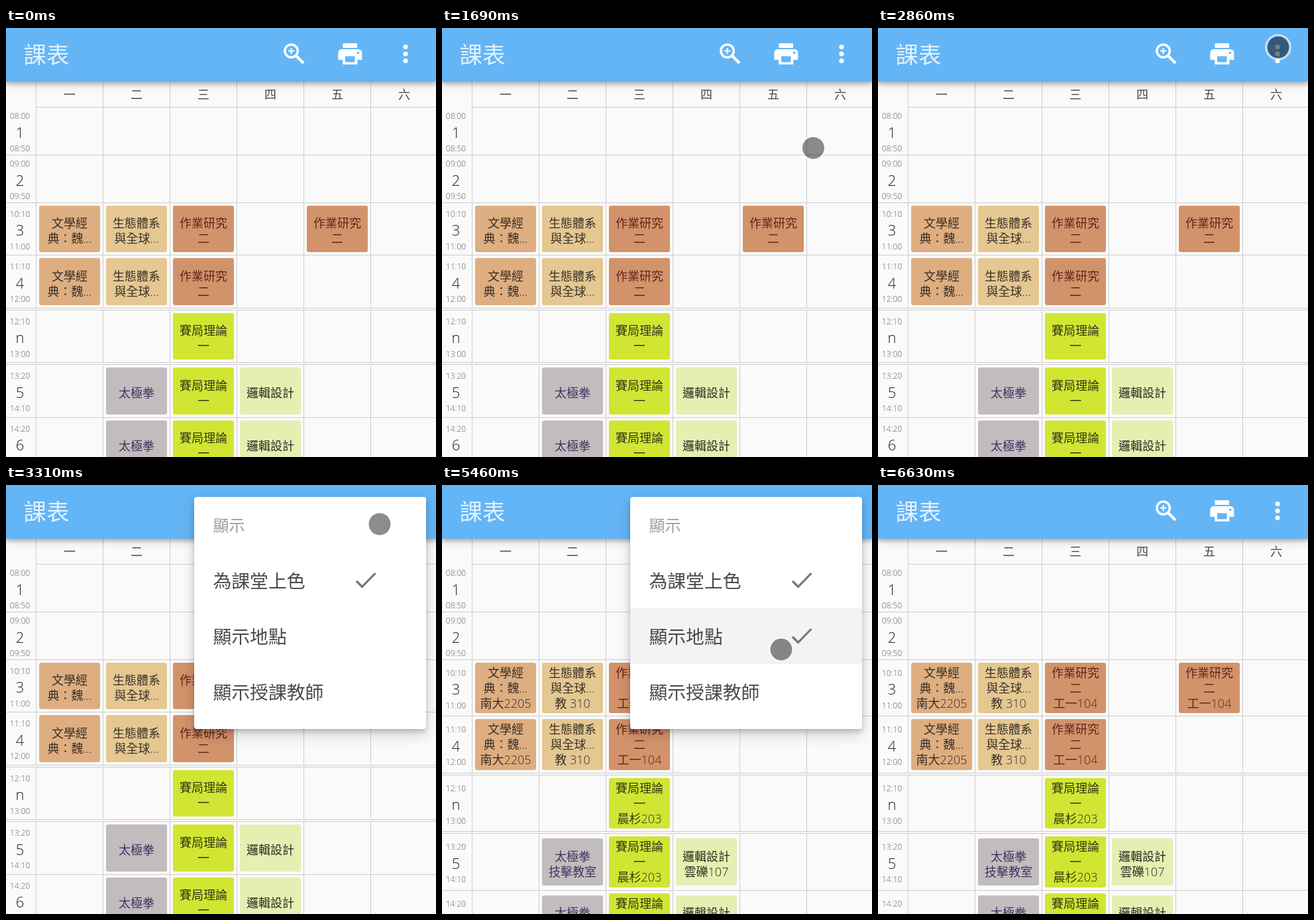
These frames come from a looping animation (649x647 px, 7380 ms). An HTML page:

```html
<!DOCTYPE html>
<html lang="zh-Hant-TW">
<head>
<meta charset="utf-8">
<title>課表</title>
<style>
html, body { margin: 0; width: 100%; height: 100%; overflow: hidden; background: #fafafa; }
svg { display: block; width: 649px; height: 647px; font-weight: 350;
  font-family: "Open Sans", "Noto Sans CJK TC", "Noto Sans CJK HK", "Noto Sans CJK JP", "Noto Sans CJK", sans-serif; }
#bar { filter: drop-shadow(0 3px 3px rgba(0,0,0,.24)) drop-shadow(0 4px 6px rgba(0,0,0,.14)); }
#panel { filter: drop-shadow(0 4px 3px rgba(0,0,0,.16)) drop-shadow(0 7px 10px rgba(0,0,0,.18)); }
#menu { transform-origin: 634px 18px; }
</style>
</head>
<body>
<svg viewBox="0 0 649 647">
  <g id="plain"></g>
  <g id="rooms"></g>
  <rect id="scroll" x="642" y="81" width="3" height="566"/>
  <g id="bar"><rect y="-20" width="649" height="101" fill="#64b5f6"/></g>
  <g id="title"></g>
  <g fill="none" stroke="#fff" stroke-width="3.5">
    <circle cx="430.6" cy="34.6" r="9.7"/>
    <path d="M437.5 41.5L449 53" stroke-width="4.4"/>
    <path d="M426 34.6h9.2M430.6 30v9.2" stroke-width="2"/>
  </g>
  <g fill="#fff">
    <path d="M508.5 23H530v7h-21.500z"/>
    <path d="M507 32h25a5.300 5.300 0 0 1 5.300 5.300V48h-7v7h-22v-7h-7V37.300A5.300 5.300 0 0 1 507 32z"/>
    <g id="dots"></g>
  </g>
  <g fill="#64b5f6"><rect x="512" y="42.500" width="14.500" height="9"/><circle cx="531.500" cy="37.500" r="1.800"/></g>
  <g id="menu">
    <rect id="panel" x="284" y="18" width="350" height="350" rx="4" fill="#fff"/>
    <rect id="press" x="284" y="186" width="350" height="84" fill="#f3f3f3"/>
    <path id="check" d="M529 145l8.500 8.500L557.500 133" fill="none" stroke="#757575" stroke-width="3.200"/>
    <use id="check2" href="#check" y="84"/>
  </g>
  <g id="touch"><circle id="halo" fill="none" stroke="#fff" stroke-opacity=".6"/><circle id="dot" r="16.500"/></g>
</svg>
<script>
const LOOP = 7380;
const $ = id => document.getElementById(id);

function add(parent, tag, attrs, text = '') {
  const el = document.createElementNS('http://www.w3.org/2000/svg', tag);
  for (const k in attrs) el.setAttribute(k, attrs[k]);
  el.textContent = text;
  parent.append(el);
}

// y is the optical centre; dense glyphs are softened to look light
function label(parent, text, x, y, size, fill, anchor = 'middle') {
  const han = /[^\x00-\x7f]/.test(text);
  add(parent, 'text', {
    x, y: y + size * (han ? .38 : .357), fill, 'font-size': size,
    'fill-opacity': han ? .82 : 1, 'text-anchor': anchor
  }, text);
}

const box = (g, x, y, width, height, fill, rx = 0) => add(g, 'rect', { x, y, width, height, fill, rx });
const colX = i => 45 + 101 * i;
const clock = m => [m / 60 | 0, m % 60].map(n => String(n).padStart(2, '0')).join(':');

const courses = [
  { lines: ['文學經', '典：魏…'], room: '南大2205', bg: '#deae80', ink: '#111' },
  { lines: ['生態體系', '與全球…'], room: '教 310', bg: '#e5c792', ink: '#111' },
  { lines: ['作業研究', '二'], room: '工一104', bg: '#d2936a', ink: '#460c0c' },
  { lines: ['賽局理論', '一'], room: '晨杉203', bg: '#d1e533', ink: '#111' },
  { lines: ['太極拳'], room: '技擊教室', bg: '#c3bcbe', ink: '#1d164a' },
  { lines: ['邏輯設計'], room: '雲礫107', bg: '#e5efb2', ink: '#000' }
];
// one string per period, one course index per weekday
const week = ['', '', '012 2', '012', '  3', ' 435', ' 435'];

function drawCard(g, course, x, mid, withRoom) {
  const lines = withRoom ? [...course.lines, course.room] : course.lines;
  const tall = lines.length > 2;
  const half = tall ? 38.25 : 35.25;
  const top = Math.round(mid - half);
  box(g, x + 5, top, 92, Math.round(mid + half) - top, course.bg, 3);
  lines.forEach((s, i) => label(g, s, x + 51,
    mid + (tall ? 0 : 3) + (i - (lines.length - 1) / 2) * 23, 18, course.ink));
}

function drawTable(g, rowHeight, withRoom) {
  for (let i = 0; i < 6; i++) {
    box(g, colX(i), 81, 1, 566, '#ccc');
    label(g, '一二三四五六'[i], colX(i) + 51, 100.5, 18, '#222');
  }
  let y = 119;
  week.forEach((days, i) => {
    if (i === 4 || i === 5) {
      const edge = Math.floor(y);
      box(g, 0, edge, 649, 3, '#fafafa');
      box(g, 0, edge, 649, 1, '#ccc');
      y += 3;
    }
    const height = i < 2 ? 72 : rowHeight;
    const mid = y + height / 2 + .25;
    const start = 480 + 60 * i + (i > 1) * 10 + (i > 4) * 10;
    box(g, i ? 0 : 45, Math.floor(y), 649, 1, '#ccc');
    label(g, clock(start), 21, mid - 22.5, 12, '#666');
    label(g, '1234n56'[i], 21, mid + 2.5, 22, '#222');
    label(g, clock(start + 50), 21, mid + 26.5, 12, '#666');
    [...days].forEach((d, col) => {
      if (d !== ' ') drawCard(g, courses[d], colX(col), mid, withRoom);
    });
    y += height;
  });
}

drawTable($('plain'), 79.5, false);
drawTable($('rooms'), 85.5, true);
label($('title'), '課表', 26.5, 40, 34.5, '#fff', 'start');
for (let i = 0; i < 3; i++) add($('dots'), 'circle', { cx: 603, cy: 28.5 + 10.5 * i, r: 3.6 });
label($('menu'), '顯示', 312.5, 60.5, 24, '#888', 'start');
['為課堂上色', '顯示地點', '顯示授課教師'].forEach((s, i) =>
  label($('menu'), s, 312.5, 144 + 84 * i, 27.8, '#222', 'start'));

// pointer stops: time, x, y
const stops = [
  [840, 494, 506], [1510, 598, 40], [2024, 466, 535], [2720, 604, 29], [3200, 604, 29],
  [3310, 564, 59], [3950, 512, 214], [5440, 512, 214], [5458, 512, 248],
  [5850, 499, 560], [6200, 499, 560], [6630, 581, 354]
];
const ramp = (t, a, b) => Math.max(0, Math.min(1, (t - a) / (b - a)));
const ease = k => k * k * (3 - 2 * k);
const during = (t, a, b) => t >= a && t < b;
const show = (id, on) => $(id).style.display = on ? '' : 'none';

function pointer(t) {
  const i = stops.findIndex(s => s[0] > t);
  const [a, b] = [stops[i - 1], stops[i]];
  const k = ease(ramp(t, a[0], b[0]));
  return [1, 2].map(n => a[n] + (b[n] - a[n]) * k);
}

function draw(t) {
  const rooms = t >= 4330;
  show('plain', !rooms);
  show('rooms', rooms);
  show('check2', rooms);
  $('scroll').style.opacity = .22 * ramp(t, 4260, 4400) * (1 - ramp(t, 4780, 5030));

  const open = ramp(t, 2910, 3110);
  show('menu', open > 0 && t < 6060);
  $('menu').style.opacity = open * (1 - ramp(t, 5900, 6060));
  $('menu').style.transform = `scale(${.8 + .2 * ease(open)})`;
  $('press').style.opacity = t < 5455 ? .25 * rooms : 1 - ramp(t, 5530, 5700);

  const visible = during(t, 840, 6629);
  show('touch', visible);
  if (visible) {
    const tap = [2880, 4320, 5870].some(at => Math.abs(t - at) < 75);
    $('touch').setAttribute('transform', `translate(${pointer(t)})`);
    $('halo').setAttribute('r', tap ? 18 : 17.2);
    $('halo').setAttribute('stroke-width', tap ? 3.5 : 2);
    $('dot').setAttribute('fill-opacity', tap ? .5 : .45);
  }
}

const begin = performance.now();
function frame() {
  draw((performance.now() - begin) % LOOP);
  requestAnimationFrame(frame);
}
frame();
</script>
</body>
</html>
```
